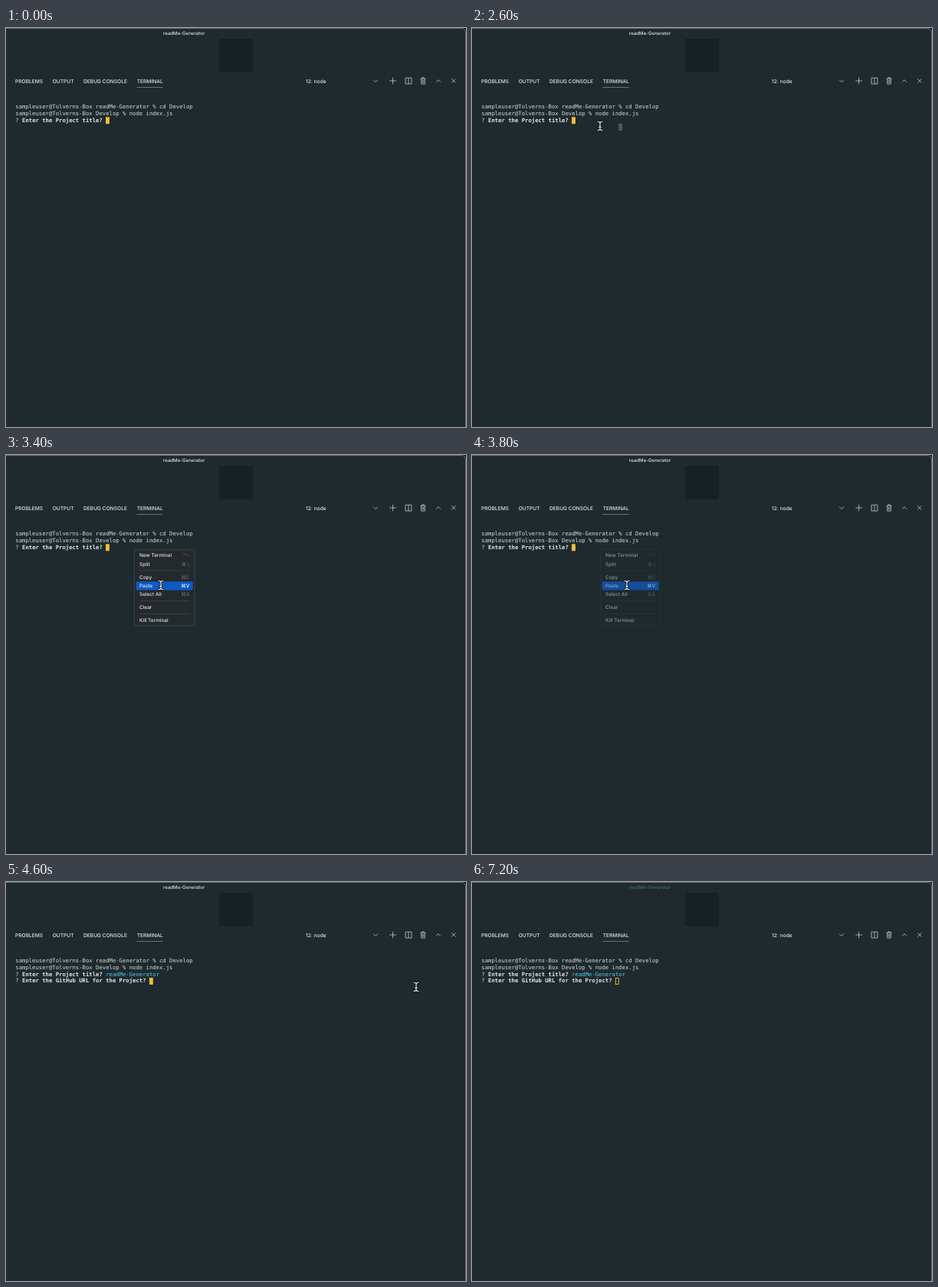
An HTML page that plays this animation: 600 by 521 pixels, repeating every 8000 ms.

```html
<!DOCTYPE html>
<html lang="en">
<head>
<meta charset="utf-8">
<title>Terminal prompt</title>
<style>
  html, body { margin: 0; height: 100%; overflow: hidden; background: #1e2a2e; }
  svg { display: block; width: 600px; height: 521px; }
  text { white-space: pre; text-rendering: geometricPrecision; }
  .ui { font: 500 6.65px Inter, sans-serif; fill: #e3e8ea; }
  .title { font-size: 6.1px; }
  .term { font: 7.26px "DejaVu Sans Mono", monospace; fill: #d3dadc; }
  .ask { font-weight: bold; fill: #dfe6e8; }
  .mark { fill: #c3e07c; font-weight: normal; }
  .answer { fill: #52c8ee; font-weight: normal; }
  .icons { fill: none; stroke: #c3cacc; stroke-width: .8; }
  .menu text { font: 500 6.45px Inter, "DejaVu Sans", sans-serif; fill: #e4e7e8; }
  .menu .key { fill: #666d70; text-anchor: end; }
  .menu .on { fill: #fff; }
</style>
</head>
<body>
<svg viewBox="0 0 600 521">
  <rect width="600" height="521" fill="#151b1d"/>
  <path d="M-1 .5H594.5a5 5 0 0 1 5 5V522H-1Z" fill="#1e2a2e" stroke="#667073"/>
  <text id="title" class="ui title" x="205" y="9.2">readMe-Generator</text>
  <rect x="278" y="14" width="44" height="44" fill="#172124"/>

  <g class="ui">
    <text x="12" y="72">PROBLEMS</text>
    <text x="60.7" y="72">OUTPUT</text>
    <text x="101" y="72">DEBUG CONSOLE</text>
    <text x="170.7" y="72">TERMINAL</text>
    <text x="391" y="72">12: node</text>
  </g>
  <path d="M170.5 77.5H204.5" stroke="#62818d" stroke-width=".9"/>
  <g class="icons">
    <path d="M479.2 67.7l2.9 2.9 2.9-2.9M500.3 69h8.6M504.6 64.7v8.6"/>
    <path d="M521 65.2h8v7.8h-8zM525 65.2v7.8"/>
    <path d="M540.5 66.2h7M542.8 66v-1.2h2.4V66M541.4 66.4l.4 6.8h4.4l.4-6.8M543.2 67.6v4.2M544.8 67.6v4.2"/>
    <path d="M561 70.6l2.9-2.9 2.9 2.9M581.2 66.3l5.2 5.2M586.4 66.3l-5.2 5.2"/>
  </g>

  <g class="term">
    <text x="12.3" y="105.3">sampleuser@Tolverns-Box readMe-Generator % cd Develop</text>
    <text x="12.3" y="114">sampleuser@Tolverns-Box Develop % node index.js</text>
    <text class="ask" x="12.3" y="122.7"><tspan class="mark">?</tspan> Enter the Project title? <tspan id="answer" class="answer">readMe-Generator</tspan></text>
    <text id="second" class="ask" x="12.3" y="131.4"><tspan class="mark">?</tspan> Enter the GitHub URL for the Project? </text>
  </g>
  <rect id="caret" width="3.9" height="8" stroke="#f8bd35" stroke-width=".9"/>
  <rect id="smudge" x="191.2" y="125" width="4.8" height="9" fill="#505a5d"/>

  <g id="menu" class="menu">
    <g id="panel">
      <rect x="167.4" y="123.7" width="78.6" height="99.3" rx="3" fill="#24292c" stroke="#43494c" stroke-width=".8"/>
      <path d="M174 151H240M174 190.5H240M174 207.5H240" stroke="#40464a" stroke-width=".8"/>
    </g>
    <rect id="highlight" x="169.6" width="74.2" height="11.2" rx="2" fill="#0f5ac2"/>
    <g id="items"></g>
  </g>

  <g id="pointer" fill="none" stroke-linecap="round">
    <path id="beam" d="M-3-5.7Q-.4-5.6 0-4Q.4-5.6 3-5.7M0-4V4M-3 5.7Q-.4 5.6 0 4Q.4 5.6 3 5.7M-1.4 1.2H1.4" stroke="#10181a" stroke-width="2.4"/>
    <use href="#beam"/>
    <path d="M-3-5.7Q-.4-5.6 0-4Q.4-5.6 3-5.7M0-4V4M-3 5.7Q-.4 5.6 0 4Q.4 5.6 3 5.7M-1.4 1.2H1.4" stroke="#f4f6f6" stroke-width="1.1"/>
  </g>
</svg>
<script>
const LOOP = 8000, STEP = 200, CELL = 4.371, LEFT = 12.3;
const $ = id => document.getElementById(id);
const set = (el, attrs) => { for (const k in attrs) el.setAttribute(k, attrs[k]); };
const show = (id, on) => { $(id).style.display = on ? "" : "none"; };

const entries = [
  ["New Terminal", "⌃~", 131], ["Split", "⌘ \\", 142.5], ["Copy", "⌘C", 159.5],
  ["Paste", "⌘V", 170.8], ["Select All", "⌘A", 182], ["Clear", "", 199], ["Kill Terminal", "", 215.8]
];
const rows = entries.map(([label, key, y]) => {
  const row = document.createElementNS("http://www.w3.org/2000/svg", "g");
  row.innerHTML = `<text x="174" y="${y + 2.3}">${label}</text><text class="key" x="239.3" y="${y + 2.3}"></text>`;
  row.lastChild.textContent = key;
  $("items").append(row);
  return row;
});

// Each cue changes some of the state from its time on.
const start = { focus: true, mouse: null, smudge: false, menu: 0, pick: -1, stage: 0 };
const cues = [
  [200, { focus: false }],
  [2000, { focus: true }],
  [2200, { mouse: [222, 139] }],
  [2400, { mouse: [193, 129] }],
  [2600, { mouse: [167, 128], smudge: true }],
  [2800, { menu: 1, smudge: false }],
  [3000, { mouse: [195, 151], pick: 1 }],
  [3200, { mouse: [198, 160], pick: 2 }],
  [3400, { mouse: [202, 170], pick: 3 }],
  [3800, { menu: .5 }],
  [4000, { menu: 0, stage: 1 }],
  [4200, { mouse: [204, 162] }],
  [4400, { mouse: [400, 148], stage: 2 }],
  [4600, { mouse: [535, 137] }],
  [4800, { mouse: null }],
  [5200, { focus: false }]
];

function draw(time) {
  const s = { ...start };
  for (const [at, change] of cues) if (at <= time) Object.assign(s, change);

  $("title").style.fill = s.focus ? "#e3e8ea" : "#4a6875";
  show("answer", s.stage > 0);
  $("answer").style.fill = s.stage === 1 ? "#d3dadc" : "";
  show("second", s.stage > 1);
  set($("caret"), {
    x: LEFT + [27, 43, 40][s.stage] * CELL + .2,
    y: s.stage > 1 ? 125.5 : 116.8,
    fill: s.focus ? "#f8bd35" : "none"
  });
  show("smudge", s.smudge);

  show("menu", s.menu);
  $("panel").style.opacity = s.menu < 1 ? .35 : 1;
  $("items").style.opacity = s.menu < 1 ? .55 : 1;
  show("highlight", s.pick >= 0);
  if (s.pick >= 0) set($("highlight"), { y: entries[s.pick][2] - 5.6, opacity: s.menu < 1 ? .75 : 1 });
  rows.forEach((row, i) => row.lastChild.classList.toggle("on", i === s.pick));

  show("pointer", s.mouse);
  if (s.mouse) set($("pointer"), { transform: `translate(${s.mouse})` });
}

function tick() {
  const time = performance.now() % LOOP;
  draw(Math.floor(time / STEP) * STEP);
  requestAnimationFrame(tick);
}
tick();
</script>
</body>
</html>
```
